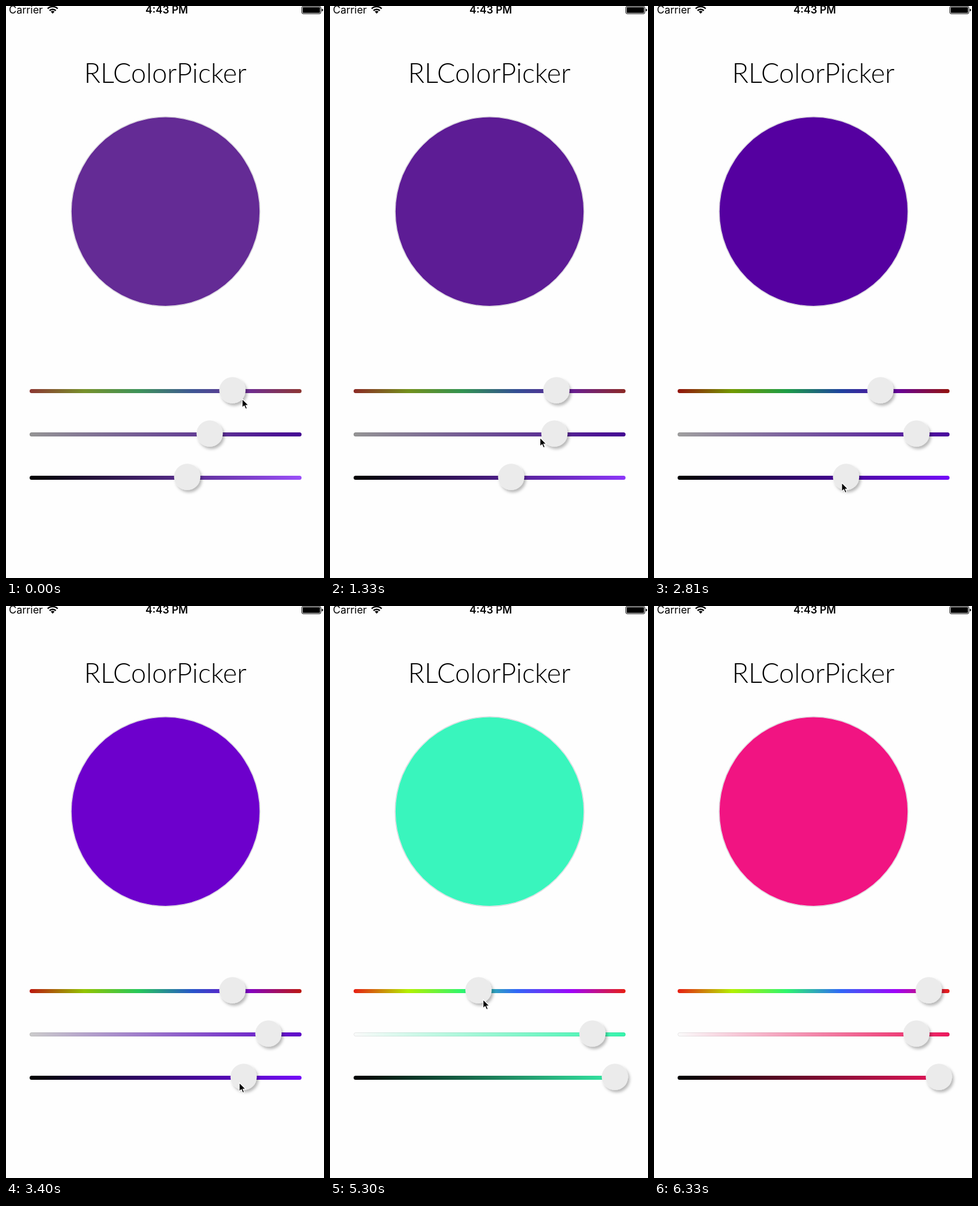
An HTML page that plays this animation: 552x990 px, repeating every 6580 ms.

```html
<!DOCTYPE html>
<html lang="en">
<head>
<meta charset="utf-8">
<title>RLColorPicker</title>
<style>
html, body { margin: 0; width: 100%; height: 100%; overflow: hidden; background: #fefefe; }
svg { display: block; width: 552px; height: 990px; }
.status { font: 18px Inter, sans-serif; }
.clock { font-weight: 600; }
.title { font: 300 47px Lato, sans-serif; }
</style>
</head>
<body>
<svg viewBox="0 0 552 990">
  <defs>
    <linearGradient id="hueGrad"/>
    <linearGradient id="satGrad"/>
    <linearGradient id="valGrad"/>
    <filter id="shadow" x="-30%" y="-30%" width="170%" height="170%">
      <feDropShadow dx="3" dy="4" stdDeviation="2.4" flood-color="#000" flood-opacity=".28"/>
    </filter>
  </defs>
  <rect width="552" height="990" fill="#fefefe"/>

  <text class="status" x="5" y="13">Carrier</text>
  <g fill="none" stroke="#000" stroke-width="2.5">
    <path d="M72.3 4.6a12.3 12.3 0 0 1 17.4 0"/>
    <path d="M75.6 8a7.6 7.6 0 0 1 10.8 0"/>
  </g>
  <path d="M81 13.2l-3.2-3.4a4.6 4.6 0 0 1 6.4 0z"/>
  <text class="status clock" x="279" y="13" text-anchor="middle">4:43 PM</text>
  <rect x="513.5" y=".5" width="33" height="13" rx="2.5" fill="none" stroke="#000"/>
  <rect x="515" y="2" width="30" height="10" rx="1"/>
  <path d="M548 4.5q2.5 .8 2.5 2.5t-2.5 2.5z"/>

  <text class="title" x="276.5" y="133" text-anchor="middle">RLColorPicker</text>

  <circle cx="277" cy="355.8" r="164.2" fill="#fefefe" stroke="#c9c6cd" stroke-width=".9"/>
  <circle id="swatch" cx="277" cy="355.8" r="163.2"/>

  <rect x="41" y="663" width="472" height="7" rx="3.5" fill="url(#hueGrad)"/>
  <rect x="41" y="738" width="472" height="7" rx="3.5" fill="url(#satGrad)"/>
  <rect x="41.5" y="738.5" width="471" height="6" rx="3" fill="none" stroke="#000" stroke-opacity=".07"/>
  <rect x="41" y="813" width="472" height="7" rx="3.5" fill="url(#valGrad)"/>
  <g fill="#ebebeb" filter="url(#shadow)">
    <circle class="knob" cy="665" r="22.8"/>
    <circle class="knob" cy="740" r="22.8"/>
    <circle class="knob" cy="815" r="22.8"/>
  </g>
  <path id="cursor" d="M0 0V15.2L3.5 12 6 17.6 8.6 16.5 6.2 11H11Z" stroke="#fff" stroke-width="1.2" stroke-linejoin="round"/>
</svg>
<script>
const LOOP = 6580, STEP = 147.2, LAST = 43;
const HUE = 0, SAT = 1, VAL = 2;
const $ = id => document.getElementById(id);
const knobs = document.querySelectorAll(".knob");

// Each drag moves one knob to x; grip is the pointer's offset from its centre
const drags = [
  { knob: SAT, from: 7, to: 11, x: 455.5, grip: -25, y: 747 },
  { knob: VAL, from: 17, to: 26, x: 494.5, grip: -7.5, y: 825 },
  { knob: HUE, from: 29, to: 32, x: 162, grip: -18, y: 685 },
  { knob: HUE, from: 32.7, to: 40, x: 477, grip: 8, y: 681 }
];

// Vivid display colours: hue, then red, green, blue
const vivid = [
  [0, 235, 30, 20], [.2, 205, 242, 0], [.236, 136, 250, 0], [.333, 40, 250, 60],
  [.459, 58, 250, 196], [.5, 60, 240, 245], [.667, 45, 50, 255],
  [.766, 136, 0, 255], [.85, 230, 15, 250], [.959, 246, 20, 132], [1, 235, 30, 20]
];

const mix = (a, b, p) => a + (b - a) * p;
const easeIn = p => p ** 1.5;
const easeOut = p => 1 - (1 - p) ** 3;

function hueColor(h) {
  const i = Math.max(1, vivid.findIndex(stop => stop[0] >= h));
  const [h0, ...a] = vivid[i - 1], [h1, ...b] = vivid[i];
  return a.map((n, k) => mix(n, b[k], (h - h0) / (h1 - h0)));
}

// Track colours lean toward the nearest primary
const trackColor = h => hueColor(h - .02 * Math.sin(6 * Math.PI * h));
const shade = (c, s, v) => `rgb(${c.map(n => Math.round(v * (255 - s * (255 - n))))})`;
const ratio = x => (x - 59) / 436;

function pose(step) {
  const xs = [393, 353.5, 314.5];
  let pointer = [410, 680], last = 0;
  const glide = (x, y, end) => {
    const p = easeOut((step - last) / (end - last));
    return { xs, pointer: [mix(pointer[0], x, p), mix(pointer[1], y, p)] };
  };
  for (const { knob, from, to, x, grip, y } of drags) {
    if (step < from) return glide(xs[knob] + grip, y, from);
    xs[knob] = mix(xs[knob], x, easeIn(Math.min(1, (step - from) / (to - from))));
    pointer = [xs[knob] + grip, y];
    if (step <= to) return { xs, pointer };
    last = to;
  }
  return glide(560, 1010, LAST);
}

function setStops(id, colors) {
  $(id).innerHTML = colors.map((c, i) =>
    `<stop offset="${i / (colors.length - 1)}" stop-color="${c}"/>`).join("");
}

function draw(ms) {
  const step = Math.min(LAST, Math.floor((ms % LOOP + 5) / STEP));
  const { xs, pointer } = pose(step);
  const [h, raw, level] = xs.map(ratio);
  const s = Math.min(1, raw * (1 + .12 * raw * raw));
  const v = level * .96 + .022;
  const pure = trackColor(h);

  $("swatch").setAttribute("fill", shade(hueColor(h), s, v));
  setStops("hueGrad", Array.from({ length: 6 }, (_, i) => shade(trackColor(i / 5), s, v)));
  setStops("satGrad", [shade(pure, 0, v), shade(pure, 1, v)]);
  setStops("valGrad", ["#000", shade(pure, s, .98)]);

  knobs.forEach((knob, i) => knob.setAttribute("cx", xs[i]));
  $("cursor").setAttribute("transform", `translate(${pointer})`);
}

const start = performance.now();
function tick() {
  draw(performance.now() - start);
  requestAnimationFrame(tick);
}
tick();
</script>
</body>
</html>
```
